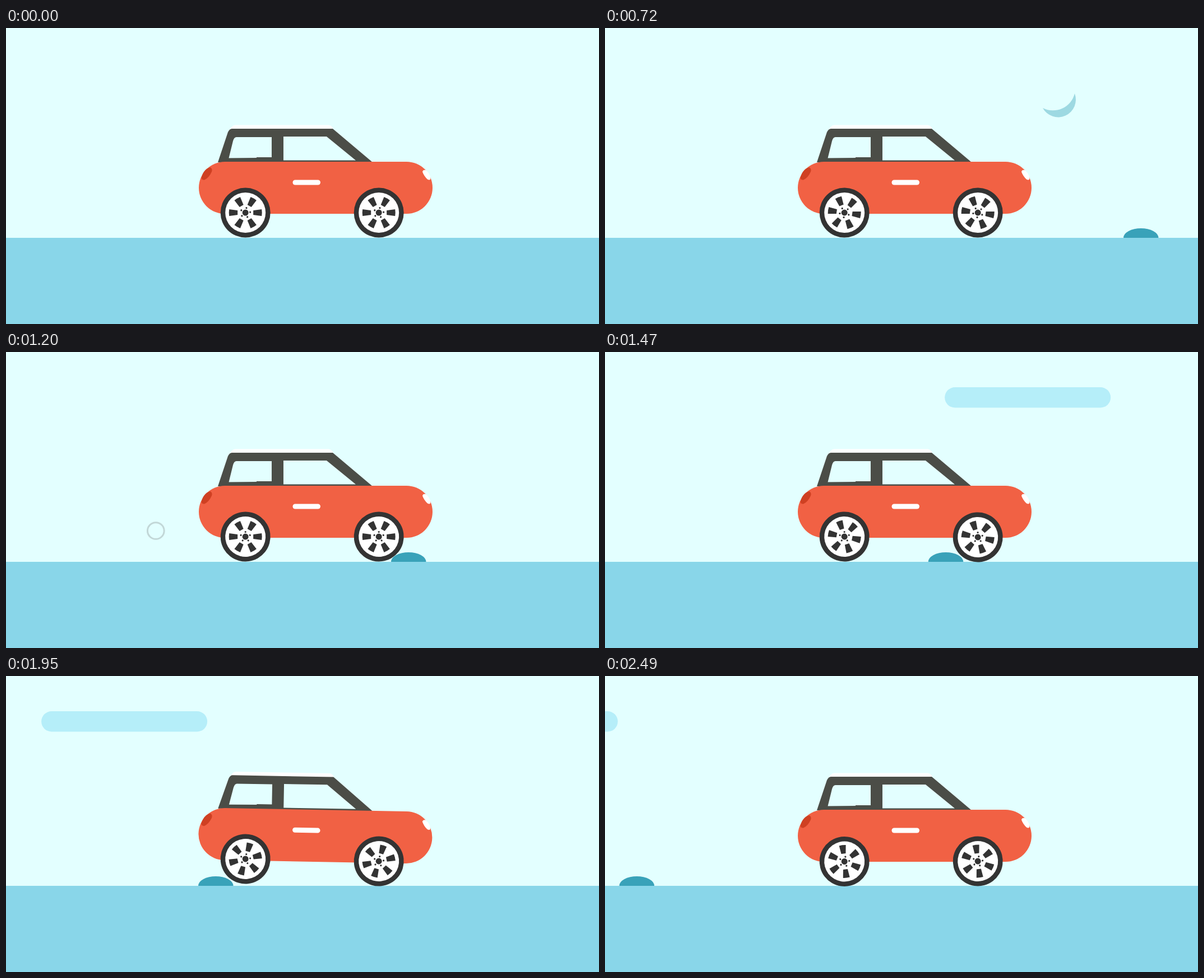
Write an HTML page that moves like this. It is 1058x529 px and loops after 2520 ms.

```html
<!DOCTYPE html>
<html lang="en">
<head>
<meta charset="utf-8">
<title>Car ride</title>
<style>
  html, body { margin: 0; width: 100%; height: 100%; overflow: hidden; background: #e3ffff; }
  svg { display: block; width: 100%; height: 100%; }
</style>
</head>
<body>
<svg viewBox="0 0 1058 529">
  <defs>
    <path id="slot" d="M14-4 29-6Q30 0 29 6L14 4Z"/>
    <circle id="lug" cx="8.5" r="1.6"/>
    <g id="wheel" fill="#333">
      <circle r="44.5"/>
      <circle r="36" fill="#fff"/>
      <circle r="5.5"/>
    </g>
  </defs>
  <rect width="1058" height="529" fill="#e3ffff"/>
  <path id="moon" fill="#9dd9e2" d="M-27.5 15A31.4 31.4 0 0 0 29.5-11A40 40 0 0 1-27.5 15Z"/>
  <rect id="cloud" y="63" width="296" height="36.5" rx="18.25" fill="#b5eef9"/>
  <circle id="smoke" cy="319.5" fill="none" stroke="#555" stroke-width="3"/>
  <rect y="375" width="1058" height="154" fill="#89d6e9"/>
  <path id="rock" fill="#39a2b9" d="M0 375A31.25 17 0 0 1 62.5 375Z"/>
  <g id="car">
    <path fill="#fff" d="M400 181Q403 173.5 409 173.5H576Q582 174 584 181Z"/>
    <path fill="#4b4d47" fill-rule="evenodd" d="M378 240 396 186Q399 180 403 180H583L654 240Z
      M411 195H474V231H447V232L397.5 232.5 405 202Q407 195 411 195Z M495 194H572L624 236.5H495Z"/>
    <rect x="344" y="239" width="417" height="93" rx="46.5" fill="#f16144"/>
    <rect x="511.5" y="271.5" width="49.5" height="9" rx="4.5" fill="#fff"/>
    <path fill="#cf4022" d="M348.5 267Q353 252 364 249Q369 251 367 257Q362 268 354 271.5Q349 272 348.5 267Z"/>
    <path fill="#fff" d="M743 257Q744 252.5 749 254Q757 261 757.5 269Q757 273 752 270.5Q746 265 743 257Z"/>
  </g>
  <g id="rear"></g>
  <g id="front"></g>
</svg>
<script>
const STEP = 30, LOOP = 2520;
const el = id => document.getElementById(id);
const set = (id, attrs) => {
  for (const name in attrs) el(id).setAttribute(name, attrs[name]);
};

// Linear interpolation through [step, value] pairs.
function along(points, n) {
  let i = 1;
  while (i < points.length - 1 && n > points[i][0]) i++;
  const [n0, v0] = points[i - 1], [n1, v1] = points[i];
  return v0 + (v1 - v0) * (n - n0) / (n1 - n0);
}

const hump = (n, from, to) =>
  n > from && n < to ? Math.sin(Math.PI * (n - from) / (to - from)) : 0;

const ROAD = [[0, 1290], [14, 1099], [18, 1058], [24, 925], [40, 687], [58, 466.5], [83, 25.5]];
const SPIN = [[0, 0], [14, 130], [24, 248], [40, 420], [58, 563], [73, 742], [83, 863]];
const MOON_X = [[19, 1085], [24, 808.5], [38, 390]];
const MOON_Y = [[19, 185], [24, 128], [32, 53], [38, 75]];

const around = (count, start, id) => Array.from({ length: count }, (_, i) =>
  `<use href="#${id}" transform="rotate(${start + i * 360 / count})"/>`).join('');
for (const id of ['rear', 'front']) {
  el(id).innerHTML = `<use href="#wheel"/><g fill="#333">${around(6, 0, 'slot')}${around(5, -6, 'lug')}</g>`;
}

function drawMoon(n) {
  const visible = n >= 19 && n < 38;
  set('moon', {
    opacity: visible ? Math.min(1, (38 - n) / 4) : 0,
    transform: `translate(${along(MOON_X, n)} ${along(MOON_Y, n)}) rotate(${(24 - n) * 3})`
  });
}

function drawCloud(n) {
  const u = n - 40.5;
  const x = 1058 - 45.6 * u + 0.65 * u * (u - 17.5) - 0.00789 * u * (u - 17.5) * (u - 32.5);
  set('cloud', { x: u < 0 ? 1058 : x });
}

function drawSmoke(rockX) {
  const seconds = (1058 - rockX) / 529;
  const phase = (((seconds - 0.237) / 0.5) % 1 + 1) % 1;
  const visible = phase > 0.75 && phase < 0.96;
  set('smoke', {
    cx: 264.5 - 643 * (phase - 0.933),
    r: 16 * phase,
    opacity: visible ? Math.min(0.5, (0.96 - phase) * 7.4) : 0
  });
}

function drawCar(n) {
  const tilt = 4 * hump(n, 54, 66) - 3.5 * hump(n, 40, 49);
  const spin = along(SPIN, n);
  const rearY = (n < 66 ? 330 : 331.5) - 8 * hump(n, 58, 66);
  const frontY = (n < 49 ? 330 : 331) - 8 * hump(n, 40, 49);
  set('car', { transform: `rotate(${tilt} 552.5 253)` });
  set('rear', { transform: `translate(427.2 ${rearY}) rotate(${spin})` });
  set('front', { transform: `translate(665.2 ${frontY}) rotate(${spin})` });
}

function draw() {
  const n = Math.floor(performance.now() % LOOP / STEP);
  const rockX = along(ROAD, n);
  set('rock', { transform: `translate(${rockX} 0)` });
  drawMoon(n);
  drawCloud(n);
  drawSmoke(rockX);
  drawCar(n);
  requestAnimationFrame(draw);
}
draw();
</script>
</body>
</html>
```
